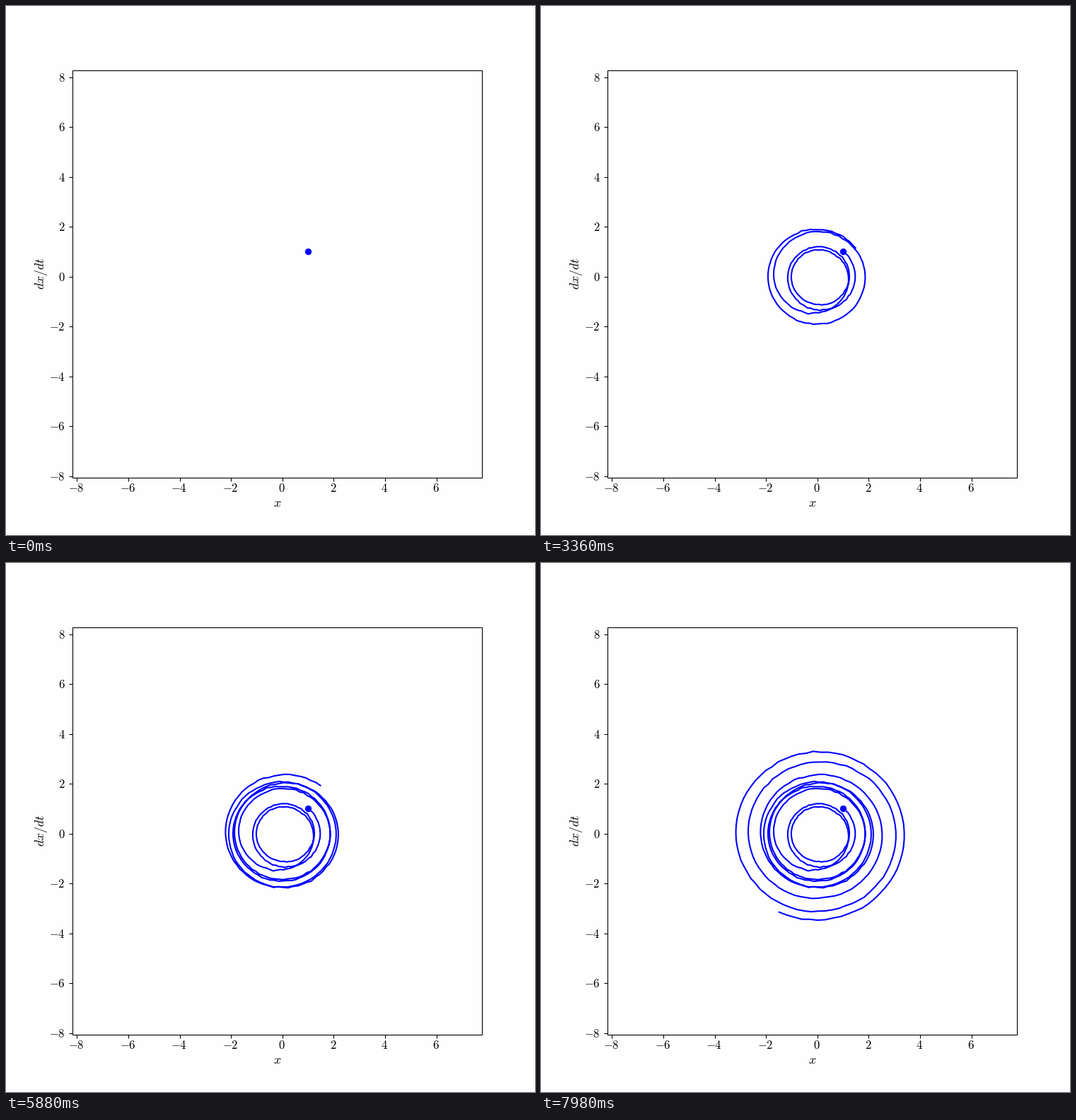
A matplotlib script for the animation above (8 s loop, 748x748 px).

```python
import numpy as np
import matplotlib.pyplot as plt
from matplotlib.animation import FuncAnimation
from matplotlib.collections import LineCollection
from matplotlib.patches import Rectangle

SIZE, DPI = 748, 88
PX = 72 / DPI                       # one pixel in points
STEPS, SUB = 133, 5                 # trajectory steps, points per step
LEFT, RIGHT, TOP, BOTTOM = 93.6, 673.2, 90.8, 666.6

# Orbit radius at each crossing of the x axis, left and right in turn.
CROSSINGS = np.array([1.15, 1.475, 1.155, 1.245, 1.016, 1.21, 1.70,
                      1.862, 1.925, 1.865, 1.867, 2.18, 2.09, 2.096,
                      2.215, 2.523, 2.694, 3.06, 3.176, 3.386, 3.52])

plt.rcParams["mathtext.fontset"] = "cm"


def to_x(x):
    return 390.8 + 36.3 * x


def to_y(v):
    return 382.7 - 35.24 * v


def spline(knots, s):
    """Catmull-Rom curve through evenly spaced knots."""
    p = np.concatenate([knots[:1], knots, knots[-1:]])
    i = np.clip(s.astype(int), 0, len(knots) - 2)
    u = s - i
    a, b, c, d = (p[i + k] for k in range(4))
    return b + 0.5 * u * (c - a + u * (2 * a - 5 * b + 4 * c - d
                                       + u * (3 * (b - c) + d - a)))


def trajectory():
    """Clockwise oscillator orbit with small random kicks in velocity."""
    t = np.arange(STEPS * SUB + 1) / SUB
    turned = np.interp(t, [0, 34, 81, STEPS], [0, 889.7, 2081.1, 3400.3])
    radius = spline(CROSSINGS, (turned + 135) / 180)
    angle = np.radians(45 - turned)
    kicks = np.random.default_rng(4).normal(0, 0.013, t.size)
    return radius * np.cos(angle), radius * np.sin(angle) + kicks


fig = plt.figure(figsize=(SIZE / DPI, SIZE / DPI), dpi=DPI, facecolor="#fefefe")
ax = fig.add_axes([0, 0, 1, 1])
ax.set(xlim=(0, SIZE), ylim=(SIZE, 0))
ax.axis("off")


def label(x, y, text, size=16.67, **kw):
    ax.text(x, y, f"${text}$", fontsize=size * PX, va="baseline", **kw)


ax.add_patch(Rectangle((LEFT, TOP), RIGHT - LEFT, BOTTOM - TOP,
                       fill=False, ec="black", lw=1.11 * PX))
ticks = []
for n in range(-8, 9, 2):
    y = to_y(n)
    ticks.append([(LEFT - 4.9, y), (LEFT, y)])
    label(83.8, y + 6, n, ha="right")
    if n < 8:
        x = to_x(n)
        ticks.append([(x, BOTTOM), (x, BOTTOM + 4.9)])
        label(x - 0.8, 686.8, n, ha="center")
ax.add_collection(LineCollection(ticks, colors="black", linewidths=1.11 * PX))
label(383.4, 708.3, "x", 18, ha="center")
label(54, 377.8, "dx/dt", 18, ha="center", rotation=90, rotation_mode="anchor")

xs, vs = trajectory()
px, py = to_x(xs), to_y(vs)
trail, = ax.plot([], [], color="blue", lw=2.08 * PX)
ax.plot(to_x(1), to_y(1), "o", color="blue", ms=8.33 * PX, mew=PX)


def update(i):
    step = i // 3
    end = step * SUB + 1 if step else 0
    trail.set_data(px[:end], py[:end])
    return trail,


anim = FuncAnimation(fig, update, frames=400, interval=20,
                     init_func=lambda: update(0), repeat=True, repeat_delay=0)
plt.show()
```
